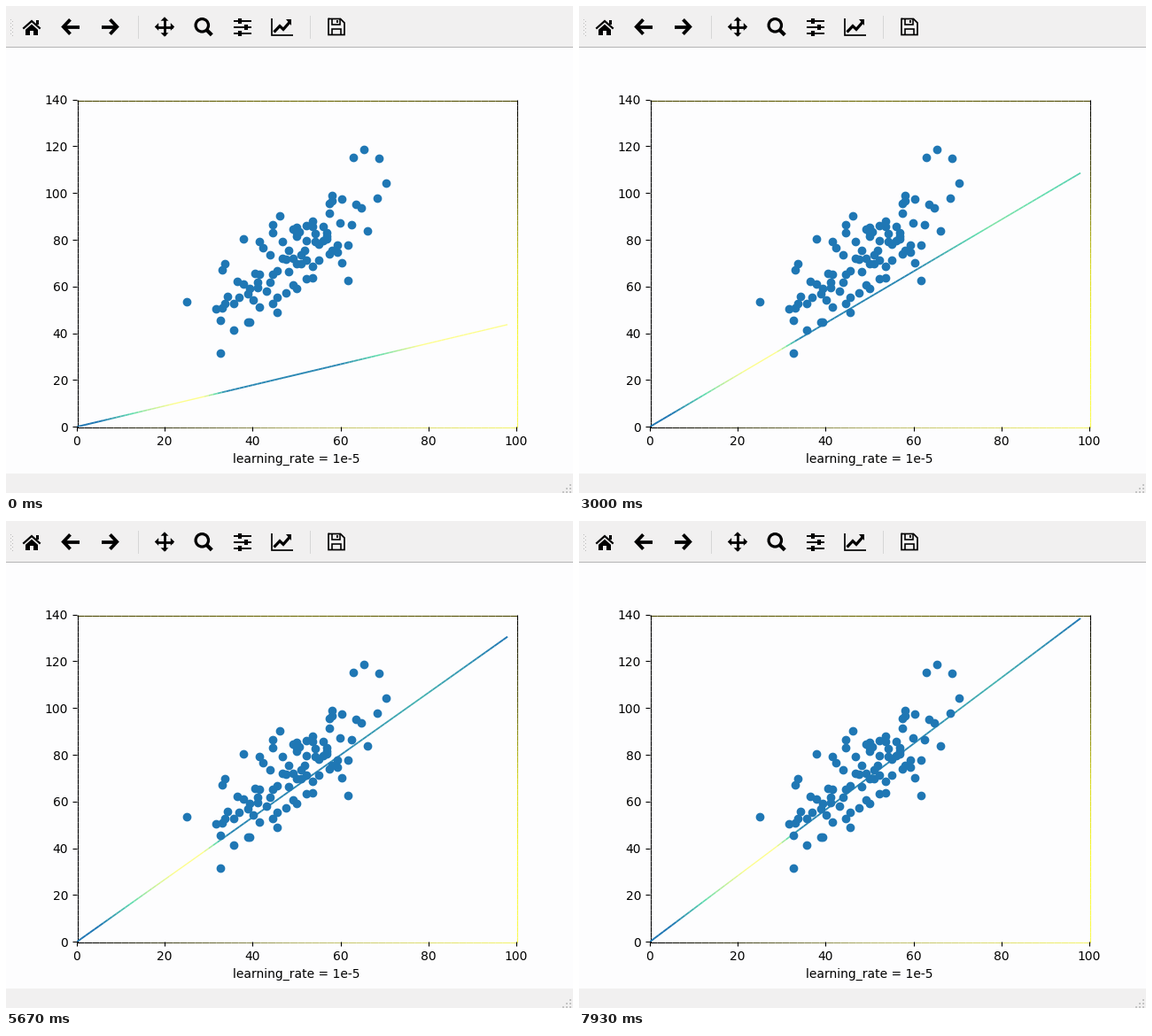
A matplotlib script that plays this animation: 640x550 px, repeating every 8 s.

```python
import matplotlib.pyplot as plt
import numpy as np
from matplotlib.animation import FuncAnimation
from matplotlib.collections import LineCollection
from matplotlib.colors import LinearSegmentedColormap
from matplotlib.patches import Circle, Polygon, Rectangle

W, H, DPI = 640, 550, 100
STEPS, LOOP = 120, 8000
BLUE, PAPER, CHROME = "#1f77b4", "#fdfdfe", "#f1f0f0"
PT = 72 / DPI  # points per pixel

# x value -> y values measured there
COLUMNS = {
    25.1: [53.5], 31.6: [50.4], 32.6: [31.7, 45.6], 33: [50.7, 67.2],
    33.75: [52.7, 69.9], 34.3: [55.7], 35.6: [41.4, 52.7], 36.4: [62.1],
    36.9: [55.2], 37.9: [61.1, 80.2], 38.9: [44.8, 56.9], 39.4: [44.9, 59.2],
    40.2: [54.1], 40.6: [65.6], 41.15: [59.4, 61.7], 41.55: [51.4, 65.3, 79.1],
    42.4: [76.6], 43.2: [58.2], 44.05: [61.7, 73.7],
    44.55: [52.7, 65.1, 82.9, 86.6], 45.5: [48.8, 55.2, 66.6], 46.2: [90.1],
    46.7: [72.2, 79.1], 47.5: [57.3, 71.5], 48.1: [66.2, 75.3],
    49.15: [60.7, 72.1, 84.7], 50.1: [59.1, 69.7, 81.5, 82.9, 85.2],
    50.6: [83.4], 51.1: [69.6, 73.4], 51.8: [75.4],
    52.3: [63.4, 71.3, 79.6, 86.1], 53.6: [63.6, 68.8, 85.7, 88],
    54.3: [79.1, 82.5], 55.1: [71.1, 78.2], 55.95: [79.6, 85.5],
    56.85: [80.2, 81.4, 83.1], 57.4: [74.1, 91.5, 95.5],
    58: [75.4, 96.8, 99.1], 59.2: [74.8, 77.6], 59.8: [87.2],
    60.3: [70.3, 97.4], 61.7: [62.6, 77.8], 62.5: [86.5], 63: [115.2],
    63.6: [95.2], 64.7: [93.6], 65.4: [118.6], 66.2: [83.9], 68.3: [97.9],
    68.8: [114.9], 70.35: [104.3],
}

fig = plt.figure(figsize=(W / DPI, H / DPI), dpi=DPI, facecolor=PAPER)
ui = fig.add_axes([0, 0, 1, 1])
ui.set(xlim=(0, W), ylim=(H, 0))
ui.axis("off")


def rect(x0, y0, x1, y1, color="black"):
    ui.add_patch(Rectangle((x0, y0), x1 - x0, y1 - y0, fc=color, ec="none"))


def shape(*pts):
    ui.add_patch(Polygon(pts, fc="black", ec="none"))


def stroke(px, *pts, color="black"):
    xs, ys = zip(*pts)
    ui.plot(xs, ys, color=color, lw=px * PT, solid_capstyle="butt",
            solid_joinstyle="miter")


def segments(xs, ys):
    pts = np.column_stack([xs, ys])
    return np.stack([pts[:-1], pts[1:]], axis=1)


def fading_edge(start, end, *stops):
    cmap = LinearSegmentedColormap.from_list("edge", stops)
    n = 61
    segs = segments(np.linspace(start[0], end[0], n),
                    np.linspace(start[1], end[1], n))
    ui.add_collection(LineCollection(
        segs, colors=cmap(np.linspace(0, 1, n - 1)), linewidths=1.1 * PT))


def arrow(tip, d):
    stroke(3.8, (tip + 9.5 * d, 15.3), (tip + 1.8 * d, 23.5),
           (tip + 9.5 * d, 31.7))
    stroke(3.8, (tip + 2.5 * d, 23.5), (tip + 19.5 * d, 23.5))


def home():
    stroke(2.2, (19.3, 25.6), (29, 17), (38.7, 25.6))
    rect(34, 16.3, 37, 21.5)
    shape((22, 26.8), (29, 20.6), (36, 26.8), (36, 33), (31, 33),
          (31, 28), (27, 28), (27, 33), (22, 33))


def move(cx, cy):
    stroke(2.8, (cx - 9, cy), (cx + 9, cy))
    stroke(2.8, (cx, cy - 9), (cx, cy + 9))
    for s in (-1, 1):
        shape((cx + 11.2 * s, cy), (cx + 6.8 * s, cy - 4.4),
              (cx + 6.8 * s, cy + 4.4))
        shape((cx, cy + 11.2 * s), (cx - 4.4, cy + 6.8 * s),
              (cx + 4.4, cy + 6.8 * s))


def zoom():
    ui.add_patch(Circle((221.3, 21.8), 7.2, fc="none", ec="black",
                        lw=3.2 * PT))
    stroke(4.2, (226, 26.5), (232.3, 32.8))


def sliders():
    for y, knob in ((17, 264), (24, 271), (31, 264)):
        stroke(1.9, (257, y), (277, y))
        rect(knob - 3.2, y - 3, knob + 3.2, y + 3, CHROME)
        rect(knob - 2.1, y - 2.7, knob + 2.1, y + 2.7)


def chart():
    stroke(1.7, (300, 14), (300, 33.2), (323.5, 33.2))
    stroke(3.2, (302.5, 29.5), (309, 22.6), (313, 26.4), (320, 18.4))
    shape((315.8, 15.3), (322.3, 15.3), (322.3, 21.8))


def floppy():
    stroke(1.7, (364, 14.5), (377.5, 14.5), (382, 19), (382, 32.5),
           (364, 32.5), (364, 13.7))
    stroke(1.6, (367.7, 14.5), (367.7, 20.6), (376.5, 20.6), (376.5, 14.5))
    rect(372.5, 15.5, 375, 19.3)
    stroke(1.6, (367.7, 32.5), (367.7, 25.6), (378.4, 25.6), (378.4, 32.5))


def window():
    rect(0, 0, W, 46, CHROME)
    rect(0, 46, W, 47, "#b4b4b4")
    rect(0, 528, W, H, CHROME)
    for x in (149, 343):
        rect(x - 0.5, 11, x + 0.5, 37, "#d6d6d6")
    for y in range(15, 33, 4):
        rect(5, y, 6, y + 1, "#bcbcbc")
        rect(7, y + 2, 8, y + 3, "#bcbcbc")
    for row in range(3):
        for col in range(row + 1):
            x, y = 636 - 4 * col, 540 + 4 * row
            rect(x, y, x + 2, y + 2, "#c4c4c4")
    home()
    arrow(63, 1)
    arrow(127, -1)
    move(179, 23.5)
    zoom()
    sliders()
    chart()
    floppy()


window()
fading_edge((80, 106.5), (577, 106.5), "#4a4600", "#6e6a00", "#4a4600")
fading_edge((80.5, 106), (80.5, 476), "black", "black")
fading_edge((576.5, 106), (576.5, 476), "black", "#55550a", "#d8d820",
            "#fafa30", "#fafa50")
fading_edge((80, 475.5), (577, 475.5), "black", "#5a5a30", "#b8b870",
            "#dcdc78", "#f4f470")

ax = fig.add_axes([80 / W, 1 - 475.2 / H, 496 / W, 369.6 / H],
                  facecolor="none")
ax.set(xlim=(0, 100), ylim=(0, 140), xlabel="learning_rate = 1e-5")
for side in ax.spines.values():
    side.set_visible(False)

points = [(x, y) for x, ys in COLUMNS.items() for y in ys]
ax.scatter(*zip(*points), color=BLUE, zorder=3)

# the fitted line washes out from blue to pale yellow along its length
wash = LinearSegmentedColormap.from_list("wash", [BLUE, "#5fdcae", "#fdfd8c"])
fit_x = np.linspace(0, 98, 99)
mid_x = (fit_x[:-1] + fit_x[1:]) / 2
fit = LineCollection([], zorder=2)
ax.add_collection(fit, autolim=False)


def update(i):
    t = i * LOOP / STEPS / 1000
    end = 145.5 - 101.8 * np.exp(-0.338 * t)
    tail = np.clip((t - 1.3) / 3, 0, 1)
    pale = np.interp(mid_x, [0, 5, 11, 17, 22, 29, 34, 60, 78, 98],
                     [0, 0, 0.4, 0.8, 1, 1, 0.08, 0.08,
                      1 - 0.7 * tail, 1 - tail])
    fit.set_segments(segments(fit_x, fit_x * end / 98))
    fit.set_color(wash(pale))
    fit.set_linewidth(1.4 - 0.4 * pale)
    return [fit]


anim = FuncAnimation(fig, update, frames=STEPS, interval=LOOP / STEPS,
                     init_func=lambda: update(0), repeat=True,
                     repeat_delay=0, blit=False)
plt.show()
```
